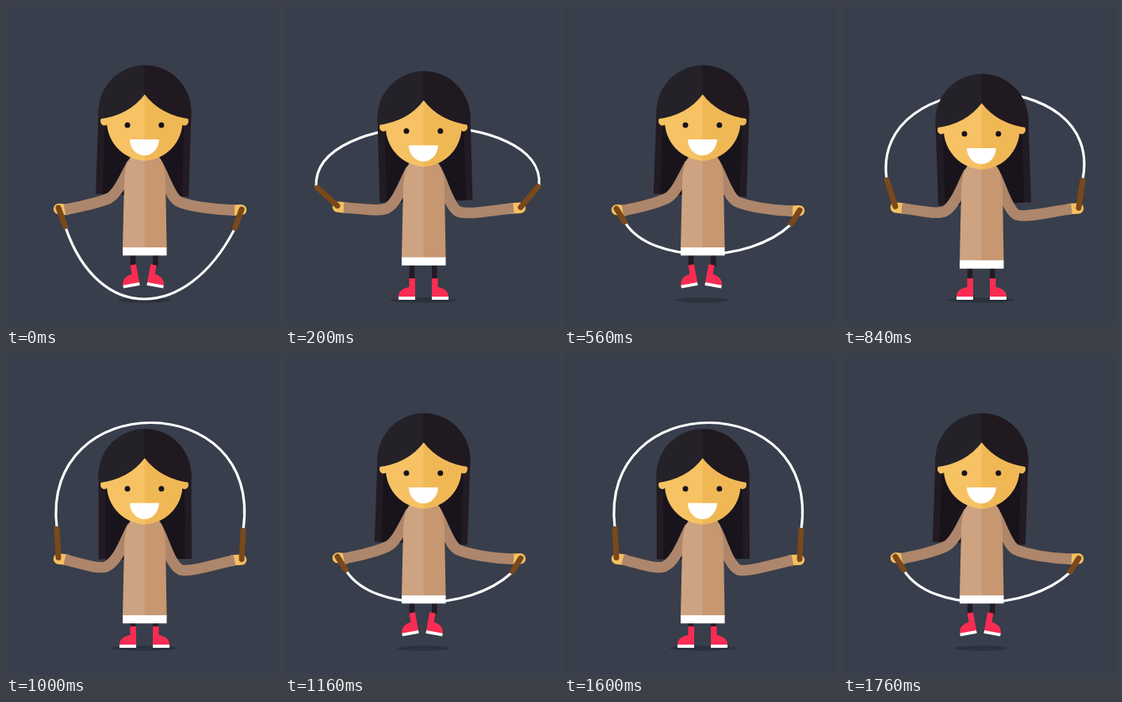
An HTML page that plays this animation: 344 px wide and 403 px high, repeating every 1800 ms.

```html
<!DOCTYPE html>
<html lang="en">
<head>
<meta charset="utf-8">
<title>Jump rope</title>
<style>
html, body { margin: 0; width: 100%; height: 100%; overflow: hidden; background: #383e4b; }
svg { display: block; width: 344px; height: 403px; }
.line { fill: none; stroke-linejoin: round; }
.rope { stroke: #fff; stroke-width: 3.2; }
.grip { stroke: #7a481b; stroke-width: 7; stroke-linecap: round; }
.arm { stroke: #ad866b; stroke-width: 13.5; }
.hand { stroke: #f5c05f; stroke-width: 13.5; stroke-linecap: round; }
.leg { stroke: #231b25; stroke-width: 6.5; }
</style>
</head>
<body>
<svg viewBox="0 0 344 403">
  <defs>
    <g id="boot">
      <path d="M-3.5 0H4V23.5H-17C-17 15 -10 12 -3.5 11Z" fill="#fb2c52"/>
      <path d="M-17 23H4V27H-17Z" fill="#fff"/>
    </g>
  </defs>
  <ellipse id="shadow" cx="174.5" cy="370.5" ry="3.3" fill="#2b313d"/>
  <path id="ropeBack" class="line rope"/>
  <g id="hair">
    <path d="M116.5 130H233.5V238.5H116.5Z" fill="#221b23"/>
    <path d="M125 130H225V238.5H125Z" fill="#19141b"/>
  </g>
  <path id="legs" class="line leg"/>
  <use id="bootL" href="#boot"/>
  <use id="bootR" href="#boot"/>
  <path id="hands" class="line hand"/>
  <path id="arms" class="line arm"/>
  <path id="dressL" fill="#cea382"/>
  <path id="dressR" fill="#c69771"/>
  <path id="hem" fill="#fff"/>
  <g id="head">
    <ellipse cx="124" cy="145" rx="5" ry="5.5" fill="#f6c263"/>
    <ellipse cx="225" cy="145" rx="5" ry="5.5" fill="#f0b855"/>
    <path d="M175 94.5A50.3 50.3 0 0 0 175 195Z" fill="#f6c263"/>
    <path d="M174.5 94.5A50.3 50.3 0 0 1 174.5 195Z" fill="#f0b855"/>
    <path d="M117 142.5L116.5 133A58.5 58.5 0 0 1 175 74.5V111Q155 138 117 142.5Z" fill="#242228"/>
    <path d="M233 142.5L233.5 133A58.5 58.5 0 0 0 174.5 74.5V111Q195 138 233 142.5Z" fill="#211920"/>
    <circle cx="153" cy="150" r="3.5" fill="#17131a"/>
    <circle cx="195.8" cy="150" r="3.5" fill="#17131a"/>
    <path d="M156 168H192.8A18.2 20 0 0 1 156 168Z" fill="#fff"/>
  </g>
  <path id="ropeFront" class="line rope"/>
  <path id="grips" class="line grip"/>
</svg>
<script>
const CYCLE = 600, STEP = 40, ROPE_TOP = 340;
const { PI, sin, cos, min, max } = Math;
const el = {};
document.querySelectorAll('[id]').forEach(n => el[n.id] = n);

const clamp = v => min(1, max(0, v));
const path = (node, d) => node.setAttribute('d', d);
const move = (node, value) => node.setAttribute('transform', value);

// 0 in the air, 1 in the deepest crouch: a slow landing, a quick spring
function crouch(t) {
  const k = t < 400 ? t / 400 : clamp((560 - t) / 160);
  return (1 - cos(PI * k)) / 2;
}

function drawBody(t, turn, handY) {
  const p = crouch(t);
  const headY = 19.7 * p ** 1.4, hemY = 304 + 25 * p;
  const top = 192 + headY, shoulder = top + 6;

  move(el.head, `translate(0 ${headY})`);
  move(el.hair, `translate(0 ${headY}) rotate(${2 * cos(turn + 0.42)} 175 133)`);

  path(el.dressL, `M175 ${top - 4}H160Q150.5 ${top + 1} 149 ${top + 28}L147 ${hemY + 1}H175Z`);
  path(el.dressR, `M174.7 ${top - 4}H190Q199.5 ${top + 1} 201 ${top + 28}L202.5 ${hemY + 1}H174.7Z`);
  path(el.hem, `M147 ${hemY}H202.5V${hemY + 10.3}H147Z`);

  const lift = min(17, 18 * max(0, cos(turn + 0.21)));
  const footY = 343 - lift, tilt = lift * 0.6;
  path(el.legs, `M160 ${hemY}V${footY + 2}M188.3 ${hemY}V${footY + 2}`);
  move(el.bootL, `translate(160 ${footY}) rotate(${-tilt})`);
  move(el.bootR, `translate(${189 - lift * 0.17} ${footY}) rotate(${tilt}) scale(-1 1)`);
  el.shadow.setAttribute('rx', 42 - lift * 0.53);

  const bendL = 242 + 26 * p, bendR = 246 + 26 * p;
  const xL = 130 - 4 * p, xR = 217 + 3 * p;
  const yL = handY + 0.5, yR = handY + 2.2;
  path(el.arms,
    `M159 ${shoulder}C151 ${shoulder + 14} 142 ${bendL - 7} ${xL} ${bendL}` +
    `C${xL - 13} ${bendL + 6 - 3 * p} 95 ${yL - 3 + 9 * p} 74 ${yL + 1}` +
    `M190 ${shoulder}C199 ${shoulder + 14} 206 ${bendR - 7} ${xR} ${bendR}` +
    `C${xR + 13} ${bendR + 6 - 3 * p} 260 ${yR - 1 + 7 * p} 288 ${yR}`);
  path(el.hands, `M76 ${yL + 1}L66.5 ${yL}M286 ${yR}L296.5 ${yR - 0.5}`);
}

// Offset of a grip's tip from the hand, x positive towards the body.
// It turns outwards on the way up and tips towards the viewer coming down.
function gripTip(t, sweep) {
  if (t < ROPE_TOP) {
    const k = clamp(t / 250);
    const angle = (20 - sweep * k) * PI / 180, len = 27 + 10 * Math.sqrt(k);
    return [len * sin(angle), len * cos(angle)];
  }
  const k = clamp((t - 400) / 200);
  return [-2 + 11 * k + 8 * sin(PI * k), 25 - 63 * (1 - k) ** 1.4];
}

function grip(x, y, [dx, dy]) {
  const k = max(0, 1 - 2 / Math.hypot(dx, dy)); // leave room for the round cap
  return `M${x} ${y}l${dx * k} ${dy * k}`;
}

function drawRope(t, turn, handY) {
  const [lx, ly] = gripTip(t, 190), [rx, ry] = gripTip(t, 200);
  const yL = handY - 1, yR = handY + 1;
  const x1 = 66 + lx, y1 = yL + ly, x2 = 297 - rx, y2 = yR + ry;

  const rise = min(t / 313, (CYCLE - t) / 240, 1);
  const middle = 369 - 339 * rise;
  const cy = (middle * 8 - y1 - y2) / 6;
  const bow = 7 + 45 * cos(turn - 0.2), sway = -2 - 8 * cos(turn);
  const d = `M${x1} ${y1}C${x1 + bow + sway} ${cy} ${x2 - bow + sway} ${cy} ${x2} ${y2}`;

  const behind = t < ROPE_TOP;
  path(el.ropeBack, behind ? d : '');
  path(el.ropeFront, behind ? '' : d);
  path(el.grips, grip(66, yL, [lx, ly]) + grip(297, yR, [-rx, ry]));
}

const start = performance.now();
function frame(now) {
  const time = max(0, now - start);
  const t = Math.floor(time / STEP) * STEP % CYCLE;
  const turn = 2 * PI * t / CYCLE;
  const handY = 255 - 2.8 * sin(turn);
  drawBody(t, turn, handY);
  drawRope(t, turn, handY);
  requestAnimationFrame(frame);
}
frame(start);
</script>
</body>
</html>
```
